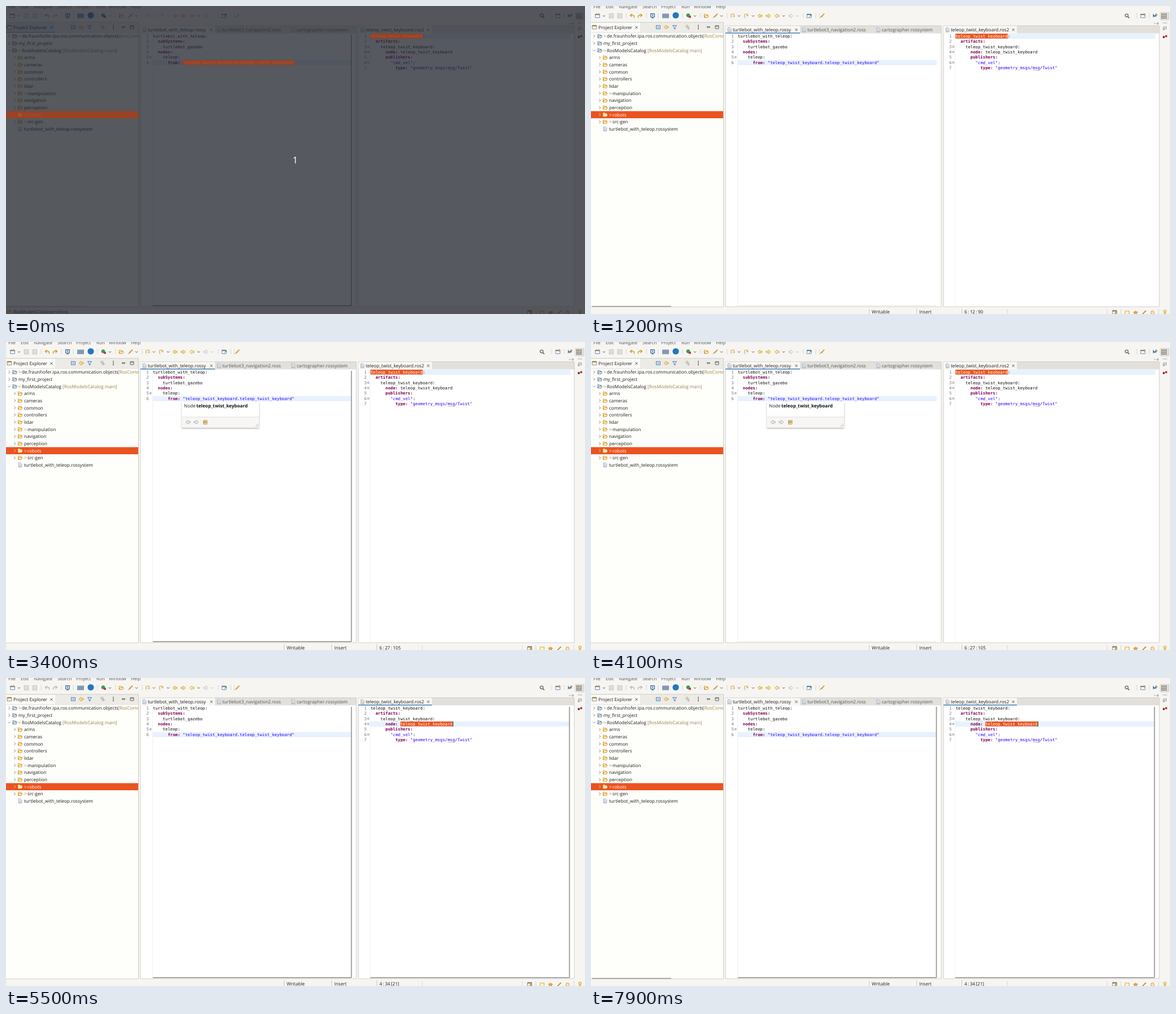
An HTML page for the animation above (8000 ms loop, 1025 px wide and 546 px high).

```html
<!DOCTYPE html>
<html lang="en">
<head>
<meta charset="utf-8">
<title>Model editor</title>
<style>
  html, body { margin: 0; width: 100%; height: 100%; overflow: hidden; background: #f6f5f1; }
  svg { display: block; width: 1025px; height: 546px; }
  text { font: 8.13px "Open Sans", "Noto Sans", sans-serif; fill: #1c1c1c; white-space: pre; text-rendering: geometricPrecision; }
  .code { font: 7.31px "DejaVu Sans Mono", monospace; fill: #111; }
  .key { font-weight: bold; fill: #7f0055; }
  .str { fill: #2a00ff; }
  .num { fill: #787878; text-anchor: end; }
  .bold { font-weight: bold; fill: #111; }
  .dim { fill: #555; }
  .git { fill: #968047; }
  .inv { fill: #fff; }
  .hint { font-size: 6.7px; fill: #777; text-anchor: end; }
  .pos { word-spacing: -.7px; }
  .count { font-size: 16.5px; fill: #fff; text-anchor: middle; }
</style>
</head>
<body>
<svg id="stage" viewBox="0 0 1025 546"></svg>
<script>
const ORANGE = '#e95420', GOLD = '#d39a2c', GREY = '#bdbbb6', BLUE = '#3173b8', INK = '#555';
const CHAR = 4.4, LINE = 9.35;
const esc = s => s.replace(/&/g, '&amp;').replace(/</g, '&lt;').replace(/>/g, '&gt;');
const rect = (x, y, w, h, fill, more = '') => `<rect x="${x}" y="${y}" width="${w}" height="${h}" fill="${fill}" ${more}/>`;
const path = (d, stroke, width = 1, fill = 'none') => `<path d="${d}" stroke="${stroke}" stroke-width="${width}" fill="${fill}"/>`;
const dot = (x, y, r, fill, more = '') => `<circle cx="${x}" cy="${y}" r="${r}" fill="${fill}" ${more}/>`;
const text = (x, y, s, cls = '') => `<text x="${x}" y="${y}" class="${cls}">${esc(s)}</text>`;
const group = (id, ...parts) => `<g id="${id}">${parts.join('')}</g>`;
const at = (x, y, s) => `<g transform="translate(${x} ${y})">${s}</g>`;

// Icons, each centred on its own origin
const folder = (c = GOLD) => path('M-3.5 3V-3H-.8L0-2H2.5V-.4M-3.5 3 L-1.8-.4H4L2.6 3Z', c, 1, '#fff3d2');
const doc = (c = '#7f93a8') => path('M-2.6-3.6H1L2.8-1.8V3.6H-2.6Z', c, .8, '#fff') + path('M-1.4-1H1.4M-1.4.6H1.4M-1.4 2.2H1.4', c, .7);
const arrow = (dir, c, fill) => `<g transform="scale(${dir} 1)">${path('M4-1.3H0V-3.4L-4 0L0 3.4V1.3H4Z', c, .9, fill)}</g>`;
const turn = (dir, c) => `<g transform="scale(${dir} 1)">${path('M3 3.2C5-1 1-2.4-3-.8M-.6-3.4L-3.6-.8L-.4 1.8', c, 1.4)}</g>`;
const disk = () => path('M-3.8-3.8H3.8V3.8H-3.8ZM-2-3.8V-.8H2V-3.8M-2.2 3.8V1H2.2V3.8', GREY, .9);
const caret = (c = INK) => path('M-2-1L0 1.2L2-1', c, 1);
const cross = () => path('M-2.2-2.2L2.2 2.2M2.2-2.2L-2.2 2.2', INK, 1);
const chevron = (open, c) => path(open ? 'M-2-1L0 1.2L2-1' : 'M-1.2-2.4L1.4 0L-1.2 2.4', c, .9);
const brush = c => path('M4-3.8L-.5.8', c, 1.8) + path('M-.5-.4L1 1L-3.8 3.6Z', c, .6, c);
const step = (dir, c) => path('M-3-3.6V3.6M-1.5-3.2H2V1', c, 1) + path(`M0 ${dir}L2 ${dir + 2}L4 ${dir}`, c, 1);
const win = (c = '#5b7ea6') => path('M-3.8-3.2H3.8V3.2H-3.8Z', c, .9, '#fff') + rect(-3.8, -3.2, 7.6, 1.8, c);
const gears = c => dot(-1, -1.5, 2, 'none', `stroke="${c}"`) + dot(1.6, 1.8, 1.5, 'none', `stroke="${c}"`);
const divider = (x, y = 17) => path(`M${x} ${y - 4}V${y + 4}`, '#aaa8a2', 1).replace('/>', ' stroke-dasharray="1 1.4"/>');

function menu() {
  const items = [[4, 'File'], [26, 'Edit'], [49, 'Navigate'], [91, 'Search'], [124, 'Project'], [160, 'Run'], [182, 'Window'], [221, 'Help']];
  return items.map(([x, s]) => text(x, 3.9, s, 'dim')).join('');
}

function toolbar() {
  const y = 17.5;
  const put = (x, s) => at(x, y, s);
  return [
    put(11.5, win() + path('M2-5V-1M0-3H4', GOLD, 1)), put(36, disk()), put(51, disk()),
    put(109, path('M-3.3-3.8H3.3V2H-3.3ZM-2 3.6H2', '#38649c', 1.2, '#e8f0fa') + rect(-1, -2, 2, 2, BLUE)),
    rect(126, 13.5, 12, 8, '#8199b4'), dot(150, 16.5, 5.6, '#2478bd'),
    put(173, dot(-1, -1, 3.3, '#3f9b4e') + rect(0, 0, 4, 3.4, '#b93a32')),
    put(204, folder()), put(220, brush('#cb9048')),
    put(299, arrow(1, GOLD, '#fbe6a4')), put(314, arrow(-1, GOLD, '#fbe6a4')),
    put(329, arrow(1, GOLD, '#fff5d6')), put(354, arrow(-1, GREY, '#f8f7f4')),
    put(386, win() + path('M0 2L4-2M1.5-2H4V.5', '#3d9259', 1)),
    ...[23, 184, 231, 341].map(x => put(x, caret())), put(365, caret(GREY)),
    ...[62, 98, 119, 162, 194, 241, 376, 398, 404, 966].map(x => divider(x)),
    put(949, dot(-.8, -.8, 2.7, 'none', `stroke="${INK}" stroke-width="1.2"`) + path('M1.2 1.2L4 4', INK, 1.5)),
    put(977, win() + path('M2.5-5V-.6M.3-2.8H4.7', GOLD, 1)), divider(988),
    put(999, path('M-3.5 2.5V-2L-1 1L1-2.5V1.5', BLUE, 1.3) + dot(2.5, -2, 1.4, GOLD)),
    rect(1007, 10.5, 17, 15, '#dedcd7', 'rx="2"'),
    ...Array.from({ length: 9 }, (_, i) => rect(1010 + i % 3 * 3.4, 13.6 + Math.floor(i / 3) * 3.4, 1.8, 1.8, '#333'))
  ].join('');
}

// Buttons whose colour depends on the active editor
function tools(id, undo, redo, steps, wand) {
  return group(id,
    at(73, 17.5, turn(1, undo)), at(87, 17.5, turn(-1, redo)),
    at(251, 17.5, step(0, steps)), at(275, 17.5, step(-2, steps)),
    at(262, 17.5, caret(steps === GREY ? GREY : INK)), at(287, 17.5, caret(steps === GREY ? GREY : INK)),
    at(409, 17.5, brush(wand)));
}

function explorer() {
  const rows = [
    [0, 'de.fraunhofer.ipa.ros.communication.objects', 1, '[RosCommonObjects main]', 198],
    [0, 'my_first_project'], [0, 'RosModelsCatalog', 1, '[RosModelsCatalog main]', 100],
    [1, 'arms'], [1, 'cameras'], [1, 'common'], [1, 'controllers'], [1, 'lidar'], [1, 'manipulation', 1],
    [1, 'navigation'], [1, 'perception'], [1, 'robots', 1], [1, 'src-gen', 1], [2, 'turtlebot_with_teleop.rossystem']
  ];
  const list = rows.map(([depth, name, changed, branch, bx], i) => {
    const y = 53.4 + i * 12.66, picked = name === 'robots', cls = picked ? 'inv' : '';
    const x = depth ? 32 : 22;
    return (depth < 2 ? at(depth ? 15.5 : 5.5, y, chevron(i === 2, picked ? '#ffd0b8' : '#777')) : '') +
      at(depth ? 25 : 15.5, y, depth === 2 ? doc() : folder(picked ? '#ffd48a' : depth ? GOLD : '#5d7fa8')) +
      (changed ? text(x, y + 2.9, '>', picked ? 'inv' : 'git') : '') +
      text(x + (changed ? 6 : 0), y + 2.9, name, cls) +
      (branch ? text(bx, y + 2.9, branch, 'git') : '');
  }).join('');
  return rect(0, 47, 234, 486, '#fefefb') + rect(0, 186.4, 234, 12.6, ORANGE) +
    `<g clip-path="url(#treeClip)">${list}</g>` +
    path('M0 29H234.5V533.5H0', '#cbc9c3', 1) + path('M0 47H234', '#d9d7d1', .8);
}

function explorerHead() {
  const y = 37.5;
  return rect(0, 29.5, 234, 17, '#edebe6') + rect(0, 29.5, 87, 17.5, '#fbfaf7') +
    group('treeFocus', rect(0, 29.5, 87, 17.5, '#d9e6f3'), rect(0, 46, 87, 1.4, '#3572b8')) +
    at(6, y, win('#8c7a4e')) + text(13, 40.7, 'Project Explorer') + at(80.5, y + .5, cross()) +
    at(119, y, path('M-3.5-3H3.5V3H-3.5ZM-2 0H2', BLUE, .9)) + at(133, y, arrow(1, GOLD, '#fbe6a4')) +
    at(148, y, path('M-3.5-3H3.5L1 .2V3.6L-1 2.4V.2Z', BLUE, .9)) + at(171, y, gears('#999')) +
    [-3, 0, 3].map(d => dot(190, y + d, 1, INK)).join('') +
    at(208, y, path('M-2.5-1H2.5V.6H-2.5Z', INK, .9)) + at(223, y, path('M-3-2.6H3V2.6H-3ZM-3-1.6H3', INK, .9));
}

function panel(x, w) {
  return rect(x, 35, w, 498, '#fff') + rect(x, 35, w, 13.5, '#e2e0db') +
    path(`M${x} 533V35H${x + w}V533Z`, '#cbc9c3', .9);
}

function tab(x, w, label, front) {
  return (front ? rect(x, 35.4, w, 13.4, '#f8f7f4') : '') + at(x + 7, 42.2, doc()) +
    text(x + 13, 45.2, label, front ? '' : 'dim') + (front ? at(x + w - 6.5, 42.2, cross()) : '');
}

const base = n => 56 + (n - 1) * LINE;
const code = (x, n, col, s, cls = '') => text(x + col * CHAR, base(n), s, 'code ' + cls);
const band = (x, n, w) => rect(x, base(n) - 7.1, w, LINE, '#e8f2fe');
const picked = (x, n, col, s) => rect(x + col * CHAR, base(n) - 6.9, s.length * CHAR, 8.5, ORANGE) + code(x, n, col, s, 'inv');

function gutter(x, count, folds) {
  let out = '';
  for (let n = 1; n <= count; n++) out += text(x, base(n), '' + n, 'code num');
  return out + folds.map(n => at(x + 2.8, base(n) - 2.6,
    dot(0, 0, 1.7, '#fff', 'stroke="#8a98a8" stroke-width=".7"') + path('M-1 0H1', '#667', .7))).join('');
}

const L = 260, R = 645.4, NAME = 'teleop_twist_keyboard';
const REF = `"${NAME}.${NAME}"`;

function leftCode() {
  return gutter(253, 6, [5]) + code(L, 1, 0, 'turtlebot_with_teleop:') + code(L, 2, 2, 'subSystems:', 'key') +
    code(L, 3, 4, 'turtlebot_gazebo') + code(L, 4, 2, 'nodes:', 'key') + code(L, 5, 4, 'teleop:') +
    code(L, 6, 6, 'from:', 'key') + code(L, 6, 12, REF, 'str');
}

function rightCode() {
  return gutter(638.5, 7, [3, 4, 6]) + code(R, 1, 0, NAME + ':') + code(R, 2, 2, 'artifacts:', 'key') +
    code(R, 3, 4, NAME + ':') + code(R, 4, 6, 'node:', 'key') + code(R, 4, 12, NAME) +
    code(R, 5, 6, 'publishers:', 'key') + code(R, 6, 8, '"cmd_vel"', 'str') + code(R, 6, 17, ':') +
    code(R, 7, 10, 'type:', 'key') + code(R, 7, 16, '"geometry_msgs/msg/Twist"', 'str') +
    path('M782 114.2H795', '#e08a8a', .7);
}

const bars = (id, x1, x2) => group(id, path(`M${x2} 51V531`, '#8f8f8d', 1.6), path(`M${x1} 531.3H${x2}`, '#8f8f8d', 1.6));

function popup(id, x, w, h, foot, extra) {
  return group(id,
    rect(x, 106, w, h, '#fff', 'filter="url(#shade)"'),
    rect(x, 106 + foot, w, h - foot, '#f7f6f4'), path(`M${x} ${106 + foot}H${x + w}`, '#d8d6d2', .8),
    text(315, 116, 'Node '), text(337, 116, NAME, 'bold'), extra);
}

function status() {
  return rect(0, 533.8, 1025, 13, '#f6f5f1') +
    group('pathInfo', at(6, 542, folder()), text(13, 545, 'RosModelsCatalog/robots')) +
    group('editInfo', text(497, 545, 'Writable'), text(581, 545, 'Insert'),
      [492, 576, 656].map(x => path(`M${x}.5 536V546`, '#c9c7c1', 1)).join(''),
      '<text id="pos" class="pos" x="661" y="545"></text>') +
    divider(737, 542) + divider(914, 542) +
    at(927, 543, win('#777') + dot(2, 1, 2, GOLD)) + divider(938, 542) +
    at(949, 543.5, path('M-3.5-2.5L-1-3.2L1-2.5L3.5-3.2V3H-3.5Z', GOLD, .9, '#fff3d2')) +
    at(964, 543.5, path('M-4-.5L0-2.6L4-.5L0 1.6ZM-2 1V3H2V1', '#d9822b', .8, '#eda64e')) +
    at(979, 543.5, path('M-3 3L2-2', '#a8763c', 1.5) + dot(2.6, -2.4, 1.4, GOLD)) +
    at(994, 543.5, dot(0, 0, 3, '#fde3c0', 'stroke="#e08a3a" stroke-width=".9"')) + divider(1005, 542) +
    at(1016, 541.5, dot(0, 0, 2.6, '#ffdf6b', `stroke="${GOLD}" stroke-width=".8"`) + rect(-1, 3, 2, 2, '#888'));
}

function sideStrip() {
  return at(999, 31, path('M-2.5 0H.5M3 -1.2H5.4V1.2H3Z', '#777', .7)) + path('M1012 30H1020', '#aaa8a2', 1) +
    at(1016, 39.5, path('M-2-2.5H2.5V1H-2ZM-.5 3H-3V-.5', '#777', .8)) +
    dot(1014, 55, 1.9, '#7d2020') + dot(1018.2, 53.4, 1.9, '#b12a2a');
}

document.getElementById('stage').innerHTML = [
  '<defs><clipPath id="treeClip"><rect x="0" y="47" width="234" height="486"/></clipPath>',
  '<filter id="shade" x="-10%" y="-30%" width="120%" height="170%"><feDropShadow dx="0" dy="1.5" stdDeviation="1.8" flood-opacity=".35"/></filter></defs>',
  rect(0, 0, 1025, 546, '#f6f5f1'), menu(), toolbar(),
  tools('toolsTree', GOLD, GREY, GREY, GREY), tools('toolsLeft', GOLD, GOLD, GOLD, GOLD), tools('toolsRight', GREY, GREY, GOLD, GOLD),
  explorerHead(), explorer(), group('treeBar', path('M2 532.5H142', '#989692', 1.6)),
  panel(238, 382), tab(238, 132, 'turtlebot_with_teleop.rossy', true),
  tab(370, 130, 'turtlebot3_navigation2.ross'), tab(501.5, 118, 'cartographer.rossystem'),
  group('leftFocus', rect(238, 47.2, 132, 1.4, '#3572b8')),
  path('M259.5 49V532', '#efeeec', .8), path('M260 531.3H611', '#e4e3e0', .8),
  band(260, 6, 352), leftCode(), group('selRef', picked(L, 6, 12, REF)),
  group('caretLeft', rect(374.4, 95.6, 1, 9, '#000')), bars('leftBars', 260, 611.5),
  panel(624, 382), tab(624, 130, 'teleop_twist_keyboard.ros2', true),
  group('rightFocus', rect(624, 47.2, 130, 1.4, '#3572b8')),
  path('M644.5 49V532', '#efeeec', .8),
  group('bandTop', band(645, 1, 354)), group('bandNode', band(645, 4, 353)), rightCode(),
  group('selTop', picked(R, 1, 0, NAME)), group('selNode', picked(R, 4, 12, NAME)),
  group('caretRight', rect(790.6, 77, 1, 9, '#000')), bars('rightBars', 645, 997.5),
  sideStrip(), status(),
  popup('hint', 312, 130, 29, 20, text(441.5, 133.3, "Press 'F2' for focus", 'hint')),
  popup('details', 311.5, 136.5, 45.5, 27,
    rect(346, 137, 13, 12, '#e6e4e0', 'id="hover" rx="2"') +
    at(322, 142, arrow(1, '#a5a39f', '#f7f6f4')) + at(337, 142, arrow(-1, '#a5a39f', '#f7f6f4')) +
    at(352.5, 142, path('M-3-3H3.5V3.5H-3Z', '#9c8a5a', .9, '#fff3d2') + `<g transform="scale(.7)">${arrow(1, GOLD, GOLD)}</g>`) +
    path('M441.5 150L446.5 145M444 150L446.5 147.5', '#aaa', .8)),
  group('countdown', rect(0, 0, 1025, 546, '#242830', 'opacity=".77"'),
    `<g opacity=".48">${rect(0, 186.4, 234, 12.6, ORANGE) + rect(312.8, 95.9, 198, 8.5, ORANGE) + rect(645.4, 49.1, 92.4, 8.5, ORANGE)}</g>`,
    text(512, 279.2, '1', 'count'))
].join('');

// Opacity steps per part: [time in ms, value], held until the next step
const STEPS = {
  countdown: [[0, 1], [100, 0]],
  treeFocus: [[0, 1], [500, 0]],
  toolsTree: [[0, 1], [500, 0]],
  toolsLeft: [[0, 0], [500, 1], [4900, 0]],
  toolsRight: [[0, 0], [4900, 1]],
  treeBar: [[0, .4], [300, .6], [500, .8], [800, 1], [3000, .7], [3100, .35], [3300, 0], [7600, .35], [7800, .7], [7900, 1]],
  leftFocus: [[0, 0], [500, 1], [4800, 0]],
  rightFocus: [[0, 0], [4800, 1]],
  selRef: [[0, 1], [500, 0]],
  leftBars: [[0, 1], [800, .8], [900, .6], [1000, .4], [1100, .2], [1200, 0], [1800, .3], [1900, .6], [2000, 1], [3900, .6], [4000, .3], [4100, 0], [4700, .4], [4800, .7], [4900, 1]],
  rightBars: [[0, 0], [4900, .4], [5000, .7], [5100, 1]],
  caretLeft: [[0, 0], [2100, 1], [2800, 0]],
  caretRight: [[0, 0], [5500, 1], [6000, 0], [6600, 1], [7300, 0], [7900, 1]],
  hint: [[0, 0], [2300, 1], [3300, 0]],
  details: [[0, 0], [3300, 1], [4700, 0]],
  hover: [[0, 0], [4500, 1]],
  bandTop: [[0, 1], [4900, 0]],
  selTop: [[0, 1], [4900, 0]],
  bandNode: [[0, 0], [4900, 1]],
  selNode: [[0, 0], [4900, 1]],
  pathInfo: [[0, 1], [500, 0]],
  editInfo: [[0, 0], [500, 1]]
};
const POSITION = [[0, '6 : 12 : 90'], [2100, '6 : 27 : 105'], [4900, '4 : 34 [21]']];
const LOOP = 8000;
const held = (steps, t) => steps.reduce((v, [from, next]) => t >= from ? next : v, steps[0][1]);
const parts = Object.entries(STEPS).map(([id, steps]) => [document.getElementById(id), steps]);
const pos = document.getElementById('pos');

const start = performance.now();
function draw(now) {
  const t = Math.max(0, now - start) % LOOP;
  for (const [el, steps] of parts) el.style.opacity = held(steps, t);
  const label = held(POSITION, t);
  if (pos.textContent !== label) pos.textContent = label;
  requestAnimationFrame(draw);
}
draw(start);
</script>
</body>
</html>
```
